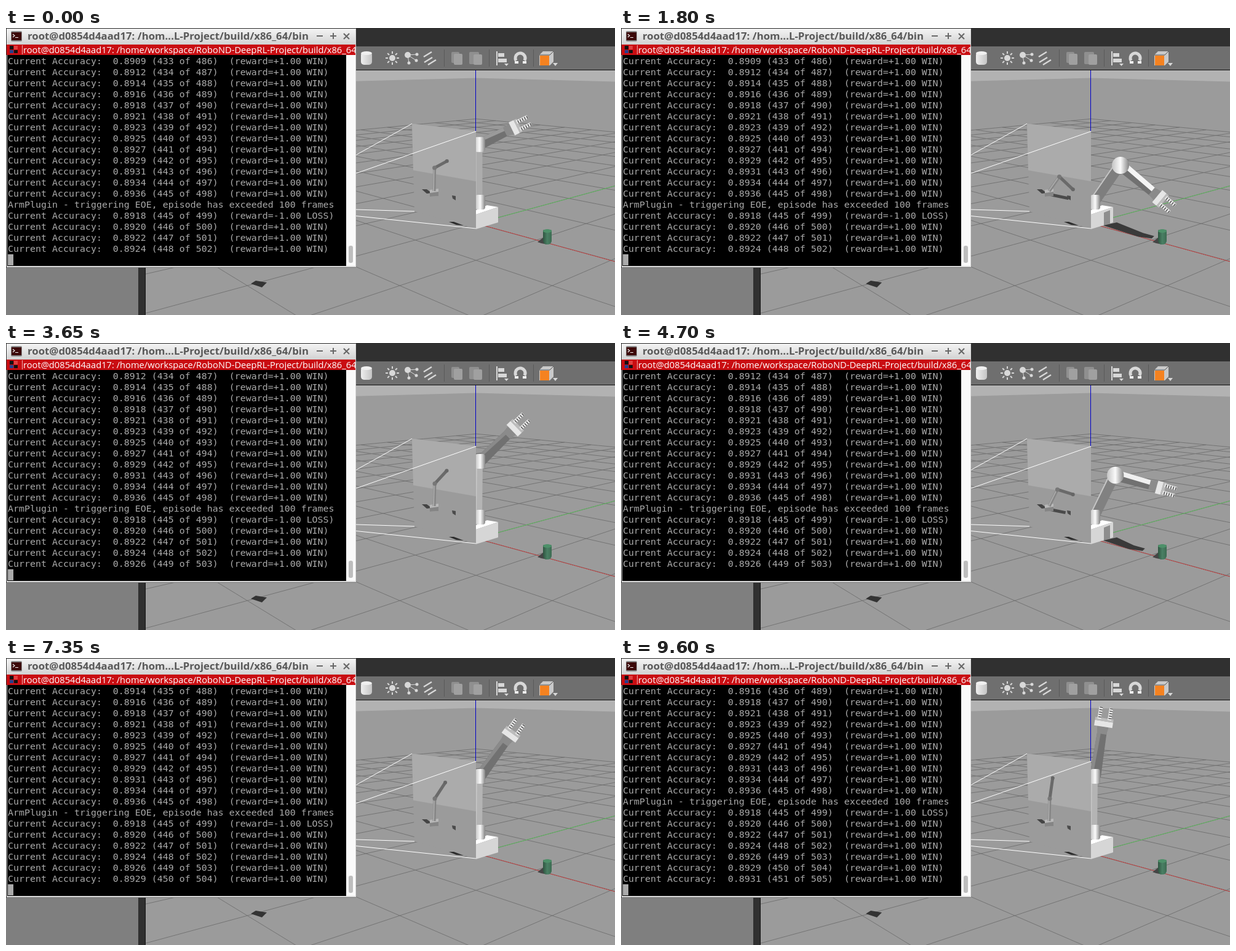
Recreate the animation shown at these times as an HTML page with a canvas. Size 990 by 468 pixels, loop 9650 ms.

```html
<!DOCTYPE html>
<html lang="en">
<head>
<meta charset="utf-8">
<title>Robot arm training</title>
<style>
html, body { margin: 0; width: 100%; height: 100%; overflow: hidden; background: #303030; }
canvas { display: block; }
</style>
</head>
<body>
<canvas id="stage" width="990" height="468"></canvas>
<script>
const ctx = document.getElementById('stage').getContext('2d');
const LOOP = 9650;
const GROUND = '#9b9b9b';

// ---------- drawing helpers ----------
function rect(x, y, w, h, color) {
  ctx.fillStyle = color;
  ctx.fillRect(x, y, w, h);
}
function poly(color, ...points) {
  ctx.beginPath();
  points.forEach(p => ctx.lineTo(p[0], p[1]));
  ctx.closePath();
  ctx.fillStyle = color;
  ctx.fill();
}
function line(color, width, ...points) {
  ctx.beginPath();
  points.forEach(p => ctx.lineTo(p[0], p[1]));
  ctx.strokeStyle = color;
  ctx.lineWidth = width;
  ctx.stroke();
}
function oval(color, x, y, rx, ry = rx) {
  ctx.beginPath();
  ctx.ellipse(x, y, rx, ry, 0, 0, 7);
  ctx.fillStyle = color;
  ctx.fill();
}
function roundRect(color, x, y, w, h, r) {
  ctx.beginPath();
  ctx.roundRect(x, y, w, h, r);
  ctx.fillStyle = color;
  ctx.fill();
}
function text(string, x, y, font, color) {
  ctx.font = font;
  ctx.fillStyle = color;
  ctx.fillText(string, x, y);
}
function ramp(x0, y0, x1, y1, ...colors) {
  const g = ctx.createLinearGradient(x0, y0, x1, y1);
  colors.forEach((c, i) => g.addColorStop(i / (colors.length - 1), c));
  return g;
}
const gray = v => `rgb(${v},${v},${v})`;
const mix = (a, b, u) => a + (b - a) * u;
const clamp01 = v => Math.max(0, Math.min(1, v));

// ---------- ground, seen from (5, -5, 2) looking at the origin ----------
const PITCH = 0.2757, FOCAL = 930;
function project(x, y) {
  const away = (y + 5 - (x - 5)) * Math.SQRT1_2;
  const side = (x - 5 + y + 5) * Math.SQRT1_2;
  const depth = away * Math.cos(PITCH) + 2 * Math.sin(PITCH);
  const up = away * Math.sin(PITCH) - 2 * Math.cos(PITCH);
  return [764 + FOCAL * side / depth, 319 - FOCAL * up / depth, depth];
}
function groundLine(at, from, color) {
  const points = [];
  for (let s = from; s <= 10; s += 0.25) {
    const p = project(...at(s));
    if (p[2] > 0.3) points.push(p);
  }
  line(color, 1, ...points);
}
function drawGround() {
  rect(227, 69, 763, 399, '#b2b2b2');
  poly(GROUND, [0, 468], project(-50, -5), project(-50, 50), project(-20, 50), [1200, 468]);
  for (let i = -10; i <= 10; i++) {
    groundLine(s => [i, s], -10, '#747474');
    groundLine(s => [s, i], -10, '#747474');
  }
  groundLine(s => [0, s], 0, '#5cb85c');
  ctx.setLineDash([2, 1]);
  line('#dd2222', 1, [764, 318.5], [990, 381]);
  ctx.setLineDash([]);
  line('#0000c8', 1, [763.5, 69], [763.5, 319]);
  poly('#333', [398, 417], [406, 412], [424, 415], [416, 423]);
}

// ---------- arm motion: elbow x, elbow y, forearm angle, forearm length, reach ----------
const UPRIGHT = [771, 193, -81, 82, 0], LEAN = [771, 193, -54, 78, 0], TILT = [771, 193, -44, 72, 0],
  RAISED = [770, 190, -26, 58, 0.15], OUT = [802, 214, 11, 68, 0.9],
  LOW = [812, 224, 40, 78, 1.15], TOUCH = [814, 228, 46, 78, 1.25];
const KEYS = [
  [0, RAISED], [1000, RAISED], [1450, OUT], [1800, LOW], [1900, TOUCH],
  [2200, UPRIGHT], [2600, UPRIGHT], [3650, TILT], [4150, RAISED], [4650, OUT], [4950, LOW], [5050, TOUCH],
  [5350, UPRIGHT], [5900, UPRIGHT], [7350, LEAN], [8150, RAISED], [8650, OUT], [9000, LOW], [9100, TOUCH],
  [9400, UPRIGHT], [LOOP, UPRIGHT]
];
const WINS = [1950, 5100, 9150];

function poseAt(t) {
  const i = KEYS.findIndex(k => k[0] > t);
  const [t0, a] = KEYS[i - 1], [t1, b] = KEYS[i];
  return a.map((v, j) => mix(v, b[j], (t - t0) / (t1 - t0)));
}

function drawCan() {
  poly('#454545', [864, 349], [873, 342], [880, 353], [870, 351]);
  roundRect(ramp(873, 0, 887, 0, '#2f5541', '#4a8064', '#3c6b52'), 873, 329, 14, 24, [2, 2, 6, 6]);
  oval('#4d9069', 880, 331, 7, 3);
}

function joint(x, y, rx, ry) {
  const fill = ramp(x - rx, 0, x + rx, 0, '#c4c4c4', '#fafafa', '#858585');
  roundRect(fill, x - rx, y - ry, 2 * rx, 2 * ry, Math.min(rx, mix(4, rx, clamp01((rx - 8) / 5))));
}

function drawBase(reach) {
  poly('#fff', [764, 297], [782, 289], [800, 292], [764, 304]);
  poly('#d6d6d6', [764, 304], [800, 292], [800, 317], [764, 328]);
  if (reach > 0.3) {
    poly('#8e8e8e', [785, 301], [795, 297], [795, 319], [785, 322]);
    const x = 784 + 72 * reach, y = 319 + 0.28 * (x - 784);
    poly('#3a3a3a', [784, 322], [806, 317], [x - 18, y - 8], [x, y - 3], [x - 4, y + 1], [x - 26, y - 2]);
  }
}

function drawForearm(angle, length, reach) {
  const lit = clamp01(reach);
  const across = 18 + 12 * Math.abs(Math.sin(angle));
  ctx.rotate(angle);
  poly('#717171', [0, -9], [length, -8], [length, 7], [0, 9]);
  poly(gray(mix(138, 245, lit)), [0, -9], [length, -8], [length, -8 + 6 + 2 * lit], [0, -4 + 3 * lit]);
  poly('#8b8b8b', [length - 12, -8], [length, -10], [length, 9], [length - 12, 7]);
  rect(length, -across / 2, 9, across, '#e6e6e6');
  rect(length + 9, -across / 2, 5, across, '#bcbcbc');
  for (const side of [-1, 1]) {
    const y = side * across * 0.28 - 3;
    rect(length + 12, y, 20, 6, '#e9e9e9');
    for (let s = 0; s < 5; s++) rect(length + 14 + s * 4, y + 1, 1.5, 5, '#555');
  }
}

function drawArm([ex, ey, degrees, length, reach]) {
  const lit = clamp01(reach), angle = degrees * Math.PI / 180;
  drawBase(reach);
  const dx = ex - 770, dy = ey - 285, d = Math.hypot(dx, dy), half = 5 + 3 * lit;
  const nx = -dy / d * half, ny = dx / d * half;
  poly(gray(Math.round(mix(180, 126, lit))),
    [769 - nx, 285 - ny], [ex - 1 - nx, ey - ny], [ex - 1 + nx, ey + ny], [769 + nx, 285 + ny]);
  line('#c6c6c6', 2, [769 - nx, 285 - ny], [ex - 1 - nx, ey - ny]);
  joint(771, 284, 8, 12);
  ctx.save();
  ctx.translate(ex, ey);
  drawForearm(angle, length, reach);
  ctx.restore();
  joint(ex, ey, 8 + 6 * lit, 12 + 2 * lit);
}

// ---------- camera picture and its view lines ----------
function drawCameraView([ex, ey, degrees, length, reach]) {
  poly(GROUND, [660, 156], [764, 168], [764, 327], [664, 299]);
  poly('#ababab', [660, 156], [764, 168], [764, 250], [662, 232]);
  poly('#2c2c2c', [720, 316], [728, 316], [744, 322], [732, 321]);

  poly('#444', [676, 263], [684, 263], [692, 269], [684, 270]);
  if (reach > 0.3) {
    line('#4a4a4a', 5, [690, 270], [700 + 24 * reach, 271 + 6 * reach]);
  }
  poly('#4b4b4b', [725, 273], [731, 274], [731, 281], [726, 278]);
  poly('#b9b9b9', [689, 264], [703, 262], [703, 274], [689, 275]);
  poly('#858585', [689, 269], [703, 267], [703, 274], [689, 275]);
  const a = degrees * Math.PI / 180;
  const x = 697 + (ex - 771) * 0.38, y = 268 + (ey - 285) * 0.42;
  const tip = [x + Math.cos(a) * (length + 10) * 0.33, y + Math.sin(a) * (length + 10) * 0.37];
  line('#858585', 5, [696, 266], [x, y]);
  line('#a9a9a9', 2, [695, 266], [x - 1, y]);
  line('#6a6a6a', 5, [x, y], tip);
  oval('#777', x, y, 3.5);
  oval('#666', tip[0], tip[1], 3);

  line('#fff', 1, [569, 207], [660, 156]);
  line('#fff', 1, [569, 237], [764, 168.5]);
  line('#fff', 1, [569, 296], [664, 299]);
  line('#fff', 1, [569, 306.5], [764, 327]);
}

// ---------- simulator frame and toolbar ----------
function drawToolbar() {
  rect(0, 0, 990, 30, '#303030');
  rect(569, 30, 421, 38, '#6f6f6f');
  rect(227, 68, 763, 1, '#111');
  rect(0, 391, 215, 77, '#7f7f7f');
  rect(215, 391, 11, 77, '#303030');
  rect(226, 391, 1, 77, '#111');
  for (const x of [712, 785, 857]) rect(x, 35, 1, 28, '#5a5a5a');

  const pale = '#d8d8d8';
  roundRect(ramp(577, 0, 595, 0, '#eee', '#c4c4c4'), 577, 39, 18, 21, 5);
  oval('#f0f0f0', 586, 41, 9, 3);

  oval(pale, 628, 49, 5);
  for (let i = 0; i < 8; i++) {
    const c = Math.cos(i * Math.PI / 4), s = Math.sin(i * Math.PI / 4);
    line(pale, 2, [628 + 7 * c, 49 + 7 * s], [628 + 11 * c, 49 + 11 * s]);
  }
  oval(pale, 653, 44, 5);
  for (const [x, y] of [[668, 43], [667, 53], [655, 57]]) {
    line(pale, 1, [653, 44], [x, y]);
    oval(pale, x, y, 2.5);
  }
  for (const [x, y] of [[679, 47], [680, 56], [686, 60]]) {
    line(pale, 2.5, [x, y], [x + 13, y - 8]);
  }

  roundRect('#8f8f8f', 724, 39, 13, 18, 2);
  roundRect('#a0a0a0', 728, 42, 14, 18, 2);
  roundRect('#8f8f8f', 753, 39, 16, 20, 2);
  roundRect('#a0a0a0', 760, 43, 14, 17, 2);

  rect(797, 38, 2, 23, pale);
  rect(800, 41, 10, 6, pale);
  rect(800, 50, 14, 6, pale);
  poly(pale, [810, 58], [817, 58], [813.5, 62]);
  ctx.beginPath();
  ctx.arc(836, 49, 8, 2.6, 6.8);
  ctx.strokeStyle = pale;
  ctx.lineWidth = 5;
  ctx.stroke();
  rect(827, 54, 6, 4, '#f2f2f2');
  rect(840, 54, 6, 4, '#f2f2f2');

  poly('#c9c9c9', [867, 44], [873, 38], [890, 38], [890, 55], [884, 61], [867, 61]);
  line('#555', 1, [867, 44], [884, 44], [890, 38]);
  rect(868, 45, 15, 16, '#f58220');
  poly(pale, [889, 57], [897, 57], [893, 62]);
}

// ---------- terminal ----------
const score = (n, total, reward = '+1.00 WIN') =>
  `Current Accuracy:  ${(n / total).toFixed(4)} (${n} of ${total})  (reward=${reward})`;
const LOG = [];
for (let n = 433; n <= 445; n++) LOG.push(score(n, n + 53));
LOG.push('ArmPlugin - triggering EOE, episode has exceeded 100 frames', score(445, 499, '-1.00 LOSS'));
for (let n = 446; n <= 451; n++) LOG.push(score(n, n + 54));

function drawTerminal(t) {
  rect(0, 0, 569, 391, '#3a3a3a');
  rect(1, 1, 568, 390, '#dadada');
  rect(1, 2, 567, 25, ramp(0, 2, 0, 27, '#f3f3f3', '#d2d2d2'));
  roundRect('#888', 8, 5, 18, 17, 2);
  rect(9, 7, 16, 13, '#3c0808');
  line('#eee', 1.2, [11, 10], [14, 12.5], [11, 15]);
  rect(15, 15, 5, 1, '#eee');
  text('root@d0854d4aad17: /hom...L-Project/build/x86_64/bin', 35, 19,
    'bold 16.8px "Open Sans", sans-serif', '#595959');
  const mark = '#686868';
  line(mark, 2, [505, 13], [515, 13]);
  line(mark, 2, [527, 13], [537, 13]);
  line(mark, 2, [532, 8], [532, 18]);
  line(mark, 2.2, [549, 9], [558, 18]);
  line(mark, 2.2, [558, 9], [549, 18]);

  ctx.save();
  ctx.beginPath();
  ctx.rect(1, 27, 567, 361);
  ctx.clip();
  rect(1, 27, 567, 17, '#c90d12');
  rect(6, 29, 6, 6, '#111');
  rect(13, 29, 6, 6, '#e04040');
  rect(6, 36, 6, 5, '#27408b');
  rect(13, 36, 6, 5, '#111');
  rect(26, 28, 1, 15, '#f0b0b0');
  text('root@d0854d4aad17: /home/workspace/RoboND-DeepRL-Project/build/x86_64/bin', 28, 41,
    '14.7px "Open Sans", sans-serif', '#fff');

  rect(2, 44, 551, 344, '#000');
  const first = WINS.filter(w => t >= w).length;
  LOG.slice(first, first + 18).forEach((row, i) =>
    text(row, 3, 59 + 18 * i, '14.95px "DejaVu Sans Mono", monospace', '#aaa'));
  if (t < 1050 || t % 1200 < 650) rect(3, 369, 9, 18, '#aaa');
  rect(553, 44, 15, 344, '#fafafa');
  roundRect('#bdbdbd', 557, 355, 7, 28, 3);
  ctx.restore();
  rect(1, 390, 568, 1, '#777');
}

function draw(t) {
  const pose = poseAt(t);
  drawGround();
  drawCan();
  drawArm(pose);
  drawCameraView(pose);
  drawToolbar();
  drawTerminal(t);
}

const start = performance.now();
function tick() {
  const t = (performance.now() - start) % LOOP;
  draw(Math.floor(t / 50) * 50);
  requestAnimationFrame(tick);
}
tick();
</script>
</body>
</html>
```
